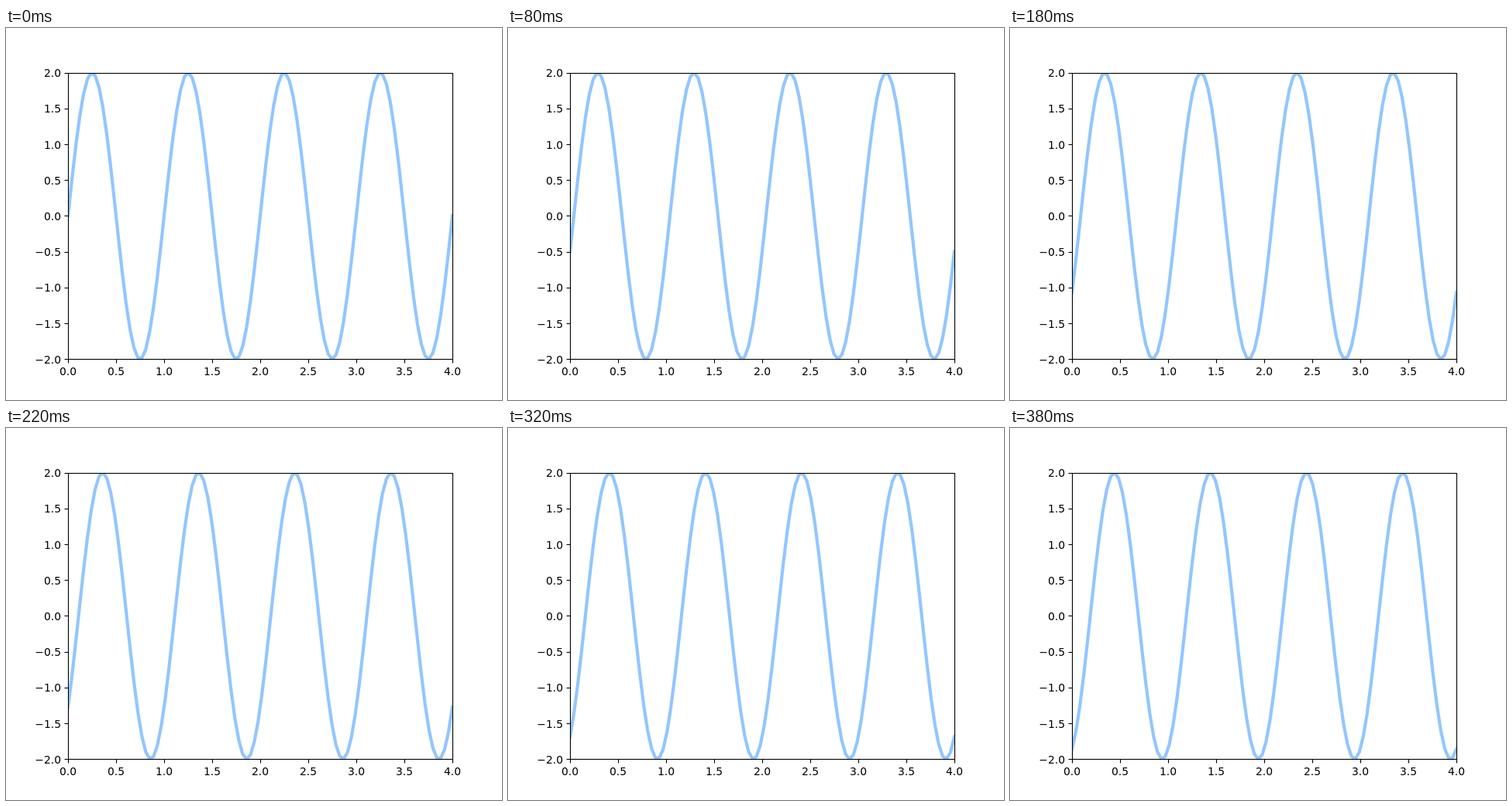
An HTML page with a canvas for the animation above (0.4 s loop, 640 px wide and 480 px high).

```html
<!DOCTYPE html>
<html lang="en">
<head>
<meta charset="utf-8">
<title>Travelling sine wave</title>
<style>
  html, body { margin: 0; height: 100%; overflow: hidden; background: #fff; }
  canvas { display: block; }
</style>
</head>
<body>
<canvas id="stage" width="640" height="480"></canvas>
<script>
const ctx = document.getElementById('stage').getContext('2d');
const STEP = 20, STEPS = 20, SAMPLES = 100;
const LEFT = 80, RIGHT = 576, TOP = 58, BOTTOM = 427;

const toX = x => 80 + 124 * x;
const toY = y => 242.4 - 92.4 * y;
const snap = v => Math.round(v) + 0.5;
const label = v => v.toFixed(1).replace('-', '\u2212');

function segment(x1, y1, x2, y2) {
  ctx.beginPath();
  ctx.moveTo(x1, y1);
  ctx.lineTo(x2, y2);
  ctx.stroke();
}

function drawWave(shift) {
  ctx.save();
  ctx.beginPath();
  ctx.rect(LEFT, TOP, RIGHT - LEFT, BOTTOM - TOP);
  ctx.clip();
  ctx.beginPath();
  for (let i = 0; i < SAMPLES; i++) {
    const x = 4 * i / (SAMPLES - 1);
    ctx.lineTo(toX(x), toY(2 * Math.sin(2 * Math.PI * (x - shift))));
  }
  ctx.strokeStyle = '#92c6ff';
  ctx.lineWidth = 4.17;
  ctx.lineJoin = 'round';
  ctx.lineCap = 'square';
  ctx.stroke();
  ctx.restore();
}

function drawAxes() {
  ctx.strokeStyle = ctx.fillStyle = '#000';
  ctx.lineWidth = 1.11;
  ctx.font = '13.89px "DejaVu Sans", sans-serif';
  ctx.strokeRect(LEFT + 0.5, TOP + 0.5, RIGHT - LEFT, BOTTOM - TOP);
  for (let i = 0; i <= 8; i++) {
    const x = toX(i / 2), y = toY(i / 2 - 2);
    segment(snap(x), BOTTOM + 0.5, snap(x), BOTTOM + 5.5);
    segment(LEFT + 0.5, snap(y), LEFT - 4.5, snap(y));
    ctx.textAlign = 'center';
    ctx.fillText(label(i / 2), x, 448);
    ctx.textAlign = 'right';
    ctx.fillText(label(i / 2 - 2), 71, Math.round(y + 5.5));
  }
}

function draw() {
  const step = Math.floor(performance.now() / STEP) % STEPS;
  ctx.fillStyle = '#fff';
  ctx.fillRect(0, 0, 640, 480);
  drawWave(step / 100);
  drawAxes();
  requestAnimationFrame(draw);
}
draw();
</script>
</body>
</html>
```
